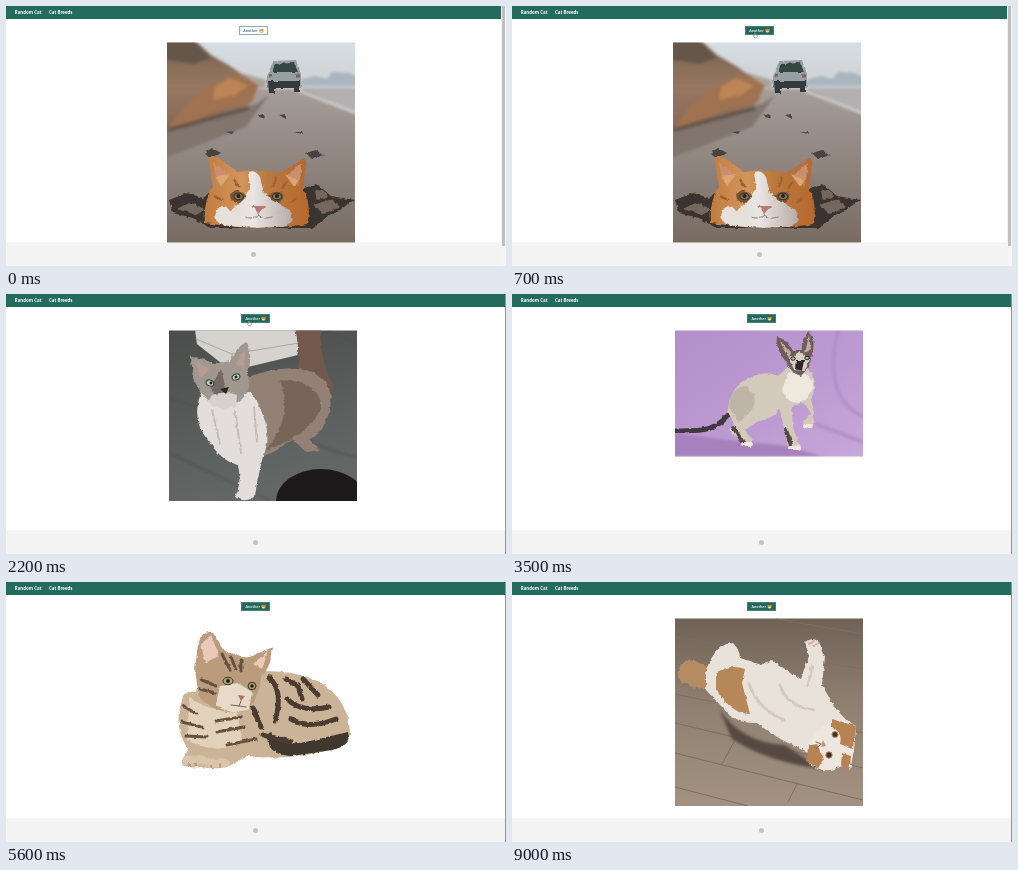
These frames come from a looping animation (500 by 260 pixels, 9.9 s). An HTML page:

```html
<!DOCTYPE html>
<html lang="en">
<head>
<meta charset="utf-8">
<title>Random Cat</title>
<style>
  html, body { margin: 0; height: 100%; overflow: hidden; background: #fefefe; }
  #stage { display: block; width: 100%; height: 100%; }
  text { font-family: "Open Sans", "Noto Sans", sans-serif; }
  .nav { font-size: 4.4px; font-weight: 700; fill: #fff; }
  .label { font-size: 3.7px; font-weight: 600; fill: #fff; }
  .fur { filter: url(#fur); }
  .soft { filter: url(#soft); }
  .line { fill: none; stroke-linecap: round; stroke-linejoin: round; }

  .scene, .cursor, .fill, .ink { animation: 9.9s step-end infinite; }
  .scene, .cursor { visibility: hidden; }
  .hole { animation-name: hole; }
  .fluffy { animation-name: fluffy; }
  .lilac { animation-name: lilac; }
  .tabby { animation-name: tabby; }
  .box { animation-name: box; }
  .lying { animation-name: lying; }
  .later { animation-name: later; }
  .cursor { animation-name: cursor; }
  .fill { animation-name: fill; }
  .ink { animation-name: ink; }
  @keyframes hole { 0% { visibility: visible } 22.2222%, 100% { visibility: hidden } }
  @keyframes fluffy { 0%, 35.3535%, 100% { visibility: hidden } 22.2222% { visibility: visible } }
  @keyframes lilac { 0%, 56.5657%, 100% { visibility: hidden } 35.3535% { visibility: visible } }
  @keyframes tabby { 0%, 71.7172%, 100% { visibility: hidden } 56.5657% { visibility: visible } }
  @keyframes box { 0%, 90.9091%, 100% { visibility: hidden } 71.7172% { visibility: visible } }
  @keyframes lying { 0% { visibility: hidden } 90.9091%, 100% { visibility: visible } }
  @keyframes later { 0% { visibility: hidden } 22.2222%, 100% { visibility: visible } }
  @keyframes cursor { 0%, 27.2727%, 100% { visibility: hidden } 3.0303% { visibility: visible } }
  @keyframes fill {
    0% { fill: #fff; stroke: #8dabb8 }
    3.0303% { fill: #fff; stroke: #8dabb8; animation-timing-function: steps(4, jump-both) }
    7.0707%, 100% { fill: #24695d; stroke: #447f76 }
  }
  @keyframes ink {
    0% { fill: #355f70 }
    3.0303% { fill: #355f70; animation-timing-function: steps(4, jump-both) }
    7.0707%, 100% { fill: #fff }
  }
</style>
</head>
<body>
<svg id="stage" viewBox="0 0 500 260" preserveAspectRatio="none">
  <defs>
    <filter id="fur" x="-5%" y="-5%" width="110%" height="110%" color-interpolation-filters="sRGB">
      <feTurbulence type="fractalNoise" baseFrequency=".22" numOctaves="2" seed="4" result="noise"/>
      <feDisplacementMap in="SourceGraphic" in2="noise" scale="3.5" xChannelSelector="R" yChannelSelector="G"/>
      <feGaussianBlur stdDeviation=".65"/>
    </filter>
    <filter id="soft"><feGaussianBlur stdDeviation="1.5"/></filter>
    <linearGradient id="sky" x2="0" y2="1"><stop stop-color="#d5dde5"/><stop offset="1" stop-color="#cfd0d1"/></linearGradient>
    <linearGradient id="road" x2="0" y2="1"><stop stop-color="#a59d99"/><stop offset=".5" stop-color="#8d827c"/><stop offset="1" stop-color="#75695f"/></linearGradient>
    <linearGradient id="wall" x2="0" y2="1"><stop stop-color="#75604f"/><stop offset=".5" stop-color="#96765f"/><stop offset="1" stop-color="#87695a"/></linearGradient>
    <linearGradient id="ginger"><stop stop-color="#c27b40"/><stop offset=".35" stop-color="#d39559"/><stop offset=".6" stop-color="#b9793f"/><stop offset="1" stop-color="#b7682d"/></linearGradient>
    <linearGradient id="muzzle"><stop stop-color="#ded7d2"/><stop offset=".45" stop-color="#eae6e3"/><stop offset="1" stop-color="#b7aaa4"/></linearGradient>
    <linearGradient id="slate" x2=".3" y2="1"><stop stop-color="#4b4c4b"/><stop offset="1" stop-color="#636866"/></linearGradient>
    <linearGradient id="violet" x2="1" y2="1"><stop stop-color="#b38fca"/><stop offset=".6" stop-color="#bd9bd2"/><stop offset="1" stop-color="#c7a8da"/></linearGradient>
    <linearGradient id="wood" x2="0" y2="1"><stop stop-color="#6f6257"/><stop offset=".45" stop-color="#8f7f70"/><stop offset="1" stop-color="#a39281"/></linearGradient>
    <linearGradient id="card" x2="1" y2="1"><stop stop-color="#d3d1d5"/><stop offset="1" stop-color="#e9e7e9"/></linearGradient>
    <pattern id="weave" width="6" height="5" patternUnits="userSpaceOnUse" patternTransform="rotate(15)">
      <rect width="6" height="5" fill="#777b73"/>
      <path d="M0 1h3M3 3.500h3" stroke="#465e5b" stroke-width="1.500"/>
      <path d="M3 1h2.500M0 3.500h2.500" stroke="#aaa390" stroke-width="1.300"/>
    </pattern>
    <g id="emoji"><path d="M-2-2L-.7-1.4H.7L2-2V.5Q1.8 2 0 2T-2 .5Z" fill="#e59442"/><path d="M-1 .8H1" stroke="#fff0d0" stroke-width=".9"/></g>
  </defs>

  <rect width="500" height="260" fill="#fefefe"/>
  <rect width="500" height="13" fill="#246b5e"/>
  <text class="nav" x="8.8" y="8">Random Cat</text>
  <text class="nav" x="43" y="8">Cat Breeds</text>
  <rect y="236.5" width="500" height="23.5" fill="#f4f4f4"/>

  <g class="scene hole">
    <rect x="495" width="5" height="260" fill="#f5f5f5"/>
    <rect x="496" width="3" height="240" fill="#bfbfbf"/>
    <circle cx="247.5" cy="248.5" r="2.5" fill="#c4c4c4"/>
    <rect class="fill" x="233.5" y="20.5" width="28" height="8"/>
    <text class="label ink" x="237.3" y="26.2">Another</text>
    <use href="#emoji" x="255.5" y="24.7"/>
    <svg x="161" y="36.5" width="188" height="200" viewBox="161 36.5 188 200">
      <rect x="161" y="36" width="188" height="50" fill="url(#sky)"/>
      <g class="soft">
        <path d="M155 83H355V245H155Z" fill="url(#road)"/>
        <path d="M296 82H355V111Z" fill="#b2b0b0"/>
        <path d="M291 84L355 109" stroke="#d9d6d2" stroke-width="2"/>
        <path d="M294 80V74L309 70 321 73 326 66 343 67 355 73V80Z" fill="#a9b5bf"/>
        <path d="M215 66L239 68 260 74V82H235Z" fill="#aaa39a"/>
        <path d="M155 30H184L205 49 224 60 250 78 243 99 155 128Z" fill="url(#wall)"/>
        <path d="M155 30H183L205 52 188 58 155 53Z" fill="#65564a"/>
        <path d="M178 101L205 79 233 69 253 79 246 96 213 104 194 112 160 126Z" fill="#a0724f"/>
        <path d="M209 81L224 72 242 80 229 89 207 94Z" fill="#bd8556"/>
        <path d="M155 128L250 98 263 89 240 121 155 154Z" fill="#81746e"/>
        <path d="M162 124L243 102" stroke="#645449" stroke-width="4"/>
      </g>
      <path class="soft" d="M301.5 36V78" stroke="#bbc2c7" stroke-width="3"/>
      <g class="fur">
        <path d="M262 68L267 55 290 54 295 68V82H261V70Z" fill="#969fa2"/>
        <path d="M266 66L269 58 288 57 292 66Z" fill="#344740"/>
        <path d="M262 75H294V86H288V82H268V87H263Z" fill="#353b3d"/>
        <path d="M263 70h4M290 70h4" stroke="#8c5a57" stroke-width="3"/>
        <path d="M198 147L206 142 215 147 204 152ZM300 147L310 144 318 150 306 153ZM220 126L228 125 226 128ZM287 126L296 125 297 128ZM251 110L257 108 258 113ZM273 109L280 108 280 113Z" fill="#484340"/>
        <path d="M163 194L181 187 197 192 217 178 292 184 311 178 325 190 348 194 335 203 325 208 306 222H205L187 212 167 207Z" fill="#3b332f"/>
        <path d="M171 203L184 196 199 204 190 209ZM307 199L326 193 334 201 318 208ZM309 185L317 184 322 190 311 194Z" fill="#76675d"/>
        <path d="M199 217Q197 195 207 181L203 153Q208 147 214 153L232 166Q252 162 274 167L294 154Q301 151 300 158L297 182Q306 200 301 218Q252 226 199 217Z" fill="url(#ginger)"/>
        <path d="M207 156L223 169 211 178ZM296 157L280 170 293 180Z" fill="#c98f70"/>
        <path d="M210 170L224 168 215 181ZM279 168L292 175 288 181Z" fill="#dca66f"/>
        <path d="M242 166Q249 163 254 171L258 187Q269 197 284 204L287 215 279 220Q249 224 216 219L214 209Q230 204 239 190L244 182Z" fill="url(#muzzle)"/>
        <path d="M215 200Q204 209 214 218L234 220 232 207Z" fill="#e7e0da"/>
        <path d="M228 173L233 181M270 171L267 181M281 175L276 183M208 190L216 194M291 192L284 197" stroke="#9c6030" stroke-width="2"/>
        <path d="M224 188Q232 181 240 191L234 197 225 194ZM263 190Q271 182 279 189L273 197 264 194Z" fill="#775135"/>
        <path d="M246 200H259L253 207Z" fill="#b97a70"/>
        <path class="line" d="M252 206V209Q247 214 239 211M252 209Q258 214 266 211" stroke="#8e7770"/>
      </g>
      <g fill="#777456" stroke="#3e2c20"><ellipse cx="232.5" cy="190.5" rx="4.5" ry="3.2"/><ellipse cx="271" cy="190.5" rx="4.5" ry="3.2"/></g>
      <circle cx="232.5" cy="190" r="2" fill="#27231f"/><circle cx="271" cy="190" r="2" fill="#27231f"/>
    </svg>
  </g>

  <g class="scene later">
    <path d="M499.5 0V260" stroke="#929292"/>
    <circle cx="249.5" cy="248.5" r="2.5" fill="#c4c4c4"/>
    <rect x="235.5" y="20.5" width="28" height="8" fill="#24695d" stroke="#447f76"/>
    <text class="label" x="239.5" y="26.2">Another</text>
    <use href="#emoji" x="257.5" y="24.7"/>
  </g>

  <svg class="scene fluffy" x="163" y="36.5" width="188" height="170.5" viewBox="163 36.5 188 170.5">
    <rect x="163" y="36" width="188" height="171" fill="url(#slate)"/>
    <path class="soft" d="M163 104L351 164M163 159L265 207M321 37L351 49" stroke="#444846"/>
    <path d="M189 36H294L292 61 225 77 191 50Z" fill="#d6d3ce"/>
    <path d="M190 45L226 60 293 49M226 60V77" class="line" stroke="#aaa7a2"/>
    <ellipse cx="315" cy="207" rx="45" ry="32" fill="#1e1a1b"/>
    <g class="fur">
      <path d="M287 94Q297 74 289 33H314Q315 75 328 91L316 121Z" fill="#73594b"/>
      <path d="M235 86Q275 68 306 78Q331 89 323 119Q315 142 303 145L314 156 300 158 286 145Q264 164 243 165L216 148Z" fill="#938176"/>
      <path d="M274 86Q317 87 315 116Q300 143 260 156Q288 123 274 86Z" fill="#786559"/>
      <path d="M195 99Q185 126 201 145Q216 168 232 171Q236 190 229 203Q239 210 249 202Q251 187 257 162Q270 137 245 98Z" fill="#e3dedb"/>
      <path d="M189 88L184 63Q194 62 208 70L224 67Q231 52 241 48Q247 61 242 79Q248 102 226 111Q203 117 189 88Z" fill="#a0978f"/>
      <path d="M189 67L204 75 194 84ZM239 54L239 75 230 70Z" fill="#b79c95"/>
      <path d="M215 75L222 103 211 104 204 94Z" fill="#746962"/>
      <path d="M206 101Q219 96 231 101L230 112Q216 119 202 108Z" fill="#d6d1cd"/>
      <path d="M206 116L214 150M229 117L235 159M248 113L251 148" class="line" stroke="#c4bdb9" stroke-width="2"/>
    </g>
    <g fill="#b5c9c6" stroke="#3c3733"><ellipse cx="204" cy="89" rx="4" ry="3" transform="rotate(20 204 89)"/><ellipse cx="230" cy="83" rx="4" ry="3" transform="rotate(-20 230 83)"/></g>
    <circle cx="205" cy="89" r="1.4" fill="#222"/><circle cx="230" cy="83" r="1.4" fill="#222"/>
    <path d="M214 95L223 93 220 100Z" fill="#2d2524"/>
  </svg>

  <svg class="scene lilac" x="163" y="36.5" width="188" height="126" viewBox="163 36.5 188 126">
    <rect x="163" y="36" width="188" height="127" fill="url(#violet)"/>
    <path class="soft" d="M160 138Q210 146 246 149T285 155L310 162H160Z" fill="#a681bd"/>
    <path class="soft line" d="M326 37Q310 103 351 123M304 130L351 148" stroke="#b08cc6" stroke-width="3"/>
    <path class="fur line" d="M221 115C205 139 188 137 162 137" stroke="#413940" stroke-width="5"/>
    <g class="fur">
      <path d="M266 82Q251 74 229 89Q215 101 216 118L222 130 217 136 231 150 239 153 241 146 232 136 247 127Q260 125 268 116L276 152 287 157 288 151 282 137 279 114Q287 109 292 109L299 119 291 127 293 135 301 133 302 116 299 106Q306 92 298 76L277 72Z" fill="#d4cabc"/>
      <path d="M276 79Q298 74 301 91Q300 104 287 109Q276 110 270 96Z" fill="#eee8df"/>
      <path d="M217 113Q217 95 233 92Q249 101 239 117L226 128Z" fill="#bfb5a7"/>
      <path d="M275 69Q263 55 265 43Q276 45 281 57L290 57Q289 43 297 37Q305 47 299 64L298 72 289 82Q279 79 275 69Z" fill="#6d5d58"/>
      <path d="M267 46L279 59 277 64ZM297 41L299 55 293 59Z" fill="#c7a7a2"/>
      <path d="M277 64L287 58 298 65 293 77 282 76Z" fill="#dbd1c3"/>
      <path d="M284 66L292 66 290 77 283 75Z" fill="#302728"/>
      <path d="M221 133L232 150M274 136L279 151" class="line" stroke="#544a48" stroke-width="4"/>
      <path d="M231 150h8M278 154h9M293 132h6" class="line" stroke="#eee7df" stroke-width="4"/>
    </g>
    <g fill="#9fb8c3" stroke="#272125"><ellipse cx="281" cy="64.5" rx="2.2" ry="1.8"/><ellipse cx="295" cy="64" rx="2.2" ry="1.8"/></g>
  </svg>

  <g class="scene tabby">
    <g class="fur">
      <path d="M178 112Q167 139 178 160L182 169 175 180Q178 187 195 185Q215 189 229 181L241 174Q274 178 306 172Q343 166 344 151Q343 120 317 102Q295 89 258 89Z" fill="#cbb397"/>
      <path d="M184 115Q202 130 231 129L236 160Q210 174 181 158Z" fill="#e3d2bb"/>
      <path d="M189 88L192 61Q200 46 207 51L219 69 241 76 267 65Q266 83 255 96Q252 122 237 130Q210 133 193 115Z" fill="#ba9c7d"/>
      <path d="M195 62L205 53 213 74 199 81ZM262 69L256 87 247 82Z" fill="#ebc8b7"/>
      <path d="M214 104L232 101 246 110 243 127Q226 135 210 123Z" fill="#e8dac8"/>
      <path d="M264 151Q279 166 304 159L342 150Q347 163 326 168L285 174Q257 172 264 151Z" fill="#40372f"/>
      <g class="line" stroke="#66503e" stroke-width="3">
        <path d="M216 72L224 88M225 75L230 88M235 78L235 89M196 98L210 104M194 107L209 111"/>
        <path d="M177 124L191 132M176 140L196 145M180 154L201 155M210 139L235 135M211 150L238 145M221 163L250 157"/>
      </g>
      <g class="line" stroke="#4b3b30" stroke-width="5">
        <path d="M263 96Q278 108 269 139M280 97L292 104 296 117M297 97L312 113M281 117Q295 131 323 125M285 137Q303 148 330 137M247 126L255 145M257 153L285 160"/>
      </g>
      <path d="M181 178H196M203 181H219" class="line" stroke="#d9c5aa" stroke-width="9"/>
      <path d="M183 181v4M190 181v4M206 183v3M214 182v4" stroke="#977b61"/>
    </g>
    <g fill="#b2a66d" stroke="#352a22"><ellipse cx="222" cy="99" rx="5" ry="3.7"/><ellipse cx="246" cy="104" rx="4" ry="3.7"/></g>
    <circle cx="222" cy="99" r="2" fill="#211d19"/><circle cx="246" cy="104" r="1.8" fill="#211d19"/>
    <path d="M232 113L239 114 235 119Z" fill="#af705f"/>
    <path class="line" d="M235 119L233 124 225 123M233 124L240 125" stroke="#7c5e4d"/>
  </g>

  <svg class="scene box" x="163" y="36.5" width="188" height="141" viewBox="163 36.5 188 141">
    <rect x="163" y="36" width="188" height="142" fill="url(#weave)"/>
    <g class="soft">
      <path d="M157 30H357V71L322 62 289 55 163 68H157Z" fill="#70482f"/>
      <path d="M157 30H235L205 58 157 66Z" fill="#4c3429"/>
      <path d="M176 30H222L211 42 179 49Z" fill="#777263"/>
      <path d="M270 37L351 61M310 37L351 48" stroke="#9c704c" stroke-width="4"/>
      <path d="M206 136L257 172 300 153 309 169 290 178H230Z" fill="#353e39" opacity=".6"/>
    </g>
    <g class="fur">
      <path d="M229 81L282 65 301 107 257 124Z" fill="#44352b"/>
      <path d="M244 55L260 49 280 55 282 72 246 73ZM280 45L292 42 300 49 297 66 281 64ZM285 65L321 72 310 82 304 109 282 116Z" fill="#cfb492"/>
      <path d="M283 65L308 71 303 109 281 116Z" fill="#b19371"/>
      <path d="M242 101L242 72 252 77 266 78 282 73 276 94 272 112 257 121 240 109Z" fill="#755f4d"/>
      <path d="M245 76L250 82 246 86ZM278 77L270 85 273 90Z" fill="#b48e78"/>
      <path d="M246 95L260 94 266 102 257 110 246 103Z" fill="#c1ae99"/>
      <path d="M253 78V86M259 78V86M266 80L264 87M272 89L265 92M271 99L264 100" class="line" stroke="#463a32" stroke-width="1.5"/>
      <path d="M204 92L257 123 256 173 209 137Z" fill="url(#card)"/>
      <path d="M257 123L300 106 297 152 256 173Z" fill="#c8c5c7"/>
      <path d="M181 62L210 67 251 103 218 100Z" fill="#d6bd98"/>
      <path d="M204 67L217 67 225 82 213 85Z" fill="#dbcfca"/>
      <path d="M181 62L218 100 251 103" class="line" stroke="#efe2ce"/>
      <path d="M217 110L241 122V141L219 128Z" fill="#d5bfca"/>
      <path d="M220 115L239 125M220 120L239 130M220 125L239 135" stroke="#eee4eb"/>
      <g fill="#47454a"><circle cx="212" cy="103" r="1.8"/><circle cx="240" cy="123" r="2"/><circle cx="278" cy="152" r="2.2"/><path d="M276 126L279 124V139L276 141ZM284 122L287 121V135L284 137Z"/></g>
      <path d="M245 143L252 140 264 149 260 159 250 163 245 153Z" fill="#ded8d4" stroke="#4d4745" stroke-width="1.5"/>
      <path d="M248 147L257 149 255 157Z" fill="#9f8171"/>
      <path d="M212 128L219 131 221 139 214 138Z" fill="#827b7b"/>
    </g>
    <g fill="#252722" stroke="#92977e" stroke-width=".7"><circle cx="248" cy="89.5" r="2.4"/><circle cx="260" cy="90.5" r="2.6"/></g>
    <path d="M251 97h5l-3 3Z" fill="#92665e"/>
  </svg>

  <svg class="scene lying" x="163" y="36.5" width="188" height="187.5" viewBox="163 36.5 188 187.5">
    <rect x="163" y="36" width="188" height="188" fill="url(#wood)"/>
    <path d="M163 55L351 87M163 112L351 151M163 141L351 186M163 171L351 218M163 205L236 224M265 37L351 52M224 156L210 182M285 202L276 220" class="line" stroke="#7d6e60"/>
    <path class="soft" d="M207 127Q230 161 273 163L309 187Q256 180 220 157Z" fill="#554a42"/>
    <g class="fur">
      <path d="M203 92Q187 76 173 79Q162 88 168 98Q182 110 207 107Z" fill="#b58b62"/>
      <path d="M194 88Q204 61 221 61Q228 68 228 76L250 83 260 78 270 85 289 97 297 74 293 60Q300 54 307 60L313 74 310 103 323 126 338 142 336 171 307 184 294 169Q266 158 245 141Q222 142 211 126L194 108Z" fill="#e9e2da"/>
      <path d="M204 92Q215 81 233 87L230 101 238 132Q217 131 204 106Z" fill="#b68758"/>
      <path d="M237 102Q247 128 272 138M268 103Q274 124 302 128M296 104L300 84" class="line" stroke="#d5cac0" stroke-width="3"/>
      <path d="M296 163L303 151Q317 136 335 138L344 144 342 168 338 188 330 184Q310 194 296 180Z" fill="#eee7df"/>
      <path d="M320 137L344 144 341 167 328 162Q331 151 320 145ZM296 164L305 162 312 178 306 187 295 179ZM330 171L339 174 337 190 329 183Z" fill="#b78352"/>
      <path d="M297 62L302 59M301 64L306 61" class="line" stroke="#d4a99b" stroke-width="2"/>
    </g>
    <g fill="#413329" stroke="#b38a53"><circle cx="323" cy="152.5" r="3"/><circle cx="317" cy="173" r="3.2"/></g>
    <path d="M311 158L309 165 314 164Z" fill="#cc8f83"/>
    <path class="line" d="M309 162L304 160M309 162L304 167" stroke="#816b5c"/>
  </svg>

  <path class="cursor" d="M242.2 31.5L241 29.5 241.7 29 242.4 29.6V26.7H243.3V28.5L245.3 29V30.5L244.7 31.7Z" fill="#fff" stroke="#333" stroke-width=".4"/>
</svg>
</body>
</html>
```
